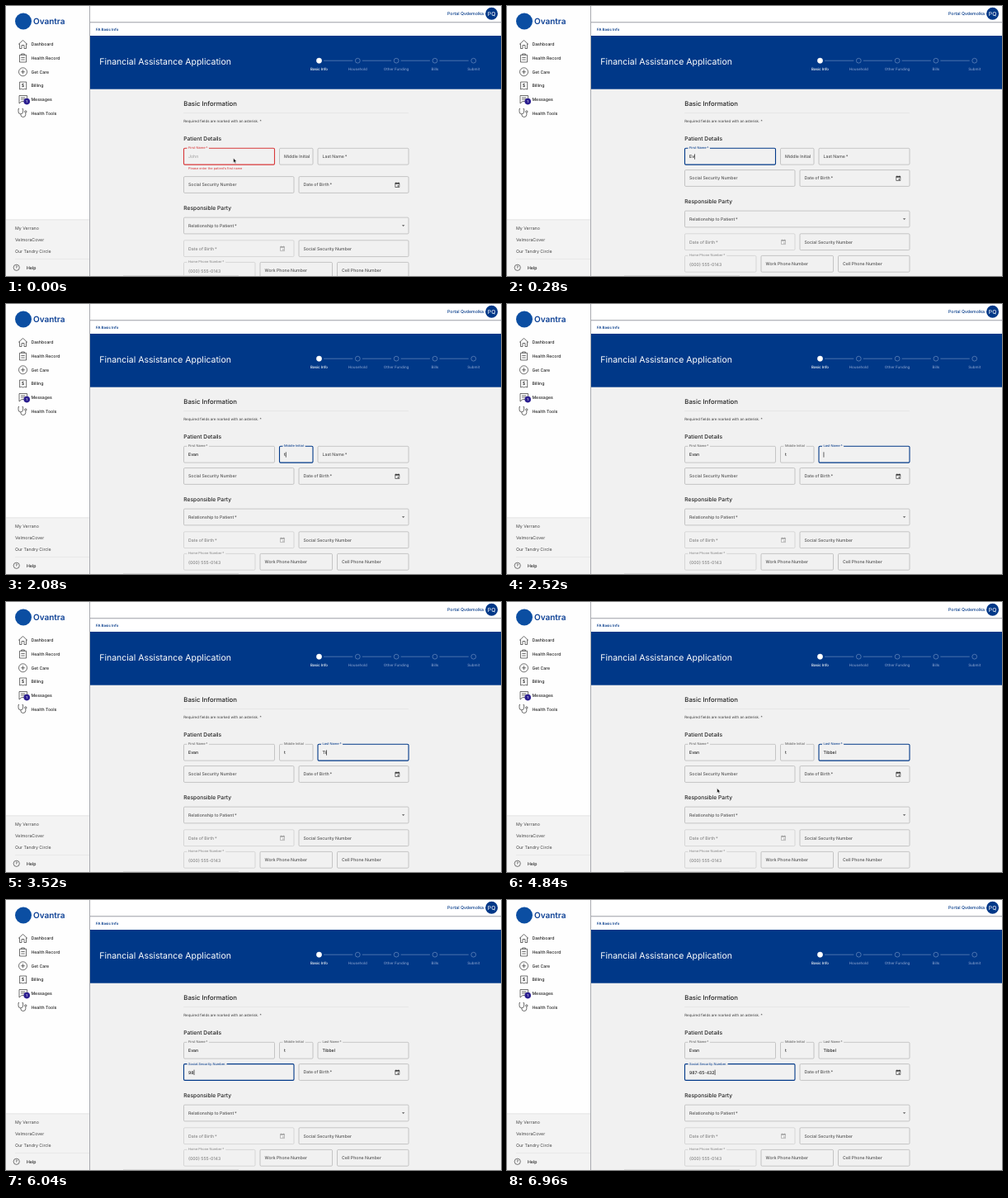
Animation of 600 by 327 pixels, one loop 7 s. Source, as an HTML page:

```html
<!DOCTYPE html>
<html lang="en">
<head>
<meta charset="utf-8">
<title>Application form</title>
<style>
  html, body { margin: 0; width: 100%; height: 100%; overflow: hidden; background: #f1f1f1; }
  svg { display: block; width: 600px; height: 327px; }
  text { font-family: Inter, sans-serif; text-rendering: geometricPrecision; white-space: pre; }
</style>
</head>
<body>
<svg viewBox="0 0 600 327"><g id="page"></g><g id="form"></g></svg>
<script>
const LOOP = 7000, STEP = 40;
const BG = '#f1f1f1', INK = '#222', GREY = '#555', PALE = '#9b9b9b';
const BLUE = '#003888', RED = '#d8383a';
const BODY = 5.2, SMALL = 4;
const pen = document.createElement('canvas').getContext('2d');

const widthOf = (s, size) => {
  pen.font = '500 100px Inter, sans-serif';
  return pen.measureText(s).width * size / 100;
};
// Text placed by its left edge and the middle of its capitals.
const text = (x, y, s, size = BODY, fill = INK, weight = 500, extra = '') =>
  `<text x="${x}" y="${y + size * .36}" font-size="${size}" fill="${fill}" font-weight="${weight}" ${extra}>${s}</text>`;
const rect = (x, y, w, h, fill, extra = '') =>
  `<rect x="${x}" y="${y}" width="${w}" height="${h}" fill="${fill}" ${extra}/>`;
const circle = (x, y, r, fill, extra = '') =>
  `<circle cx="${x}" cy="${y}" r="${r}" fill="${fill}" ${extra}/>`;
const path = (d, stroke = INK, width = .65, fill = 'none') =>
  `<path d="${d}" fill="${fill}" stroke="${stroke}" stroke-width="${width}"/>`;
const middle = 'text-anchor="middle"';

function drawPage() {
  const menu = ['Dashboard', 'Health Record', 'Get Care', 'Billing', 'Messages', 'Health Tools'];
  const steps = ['Basic Info', 'Household', 'Other Funding', 'Bills', 'Submit'];
  const icons = [
    'M15 46.5L20.5 41.5L26 46.5M16.5 45.5V51.5H19V47.5H22V51.5H24.5V45.5',
    'M16.5 59.3H24.5V68H16.5ZM18.7 59.3V58H22.3V59.3M18.3 62.5H22.7M18.3 65H22.7',
    'M15.5 79.8a5 5 0 1 0 10 0a5 5 0 1 0 -10 0M18 79.8H23M20.5 77.3V82.3',
    'M16.6 92H24.7V101L22.7 100.3L20.6 101L18.6 100.3L16.6 101Z',
    'M16 108.5H25.5V115.5H19L16 118ZM18 111H23.5M18 113H23.5',
    'M16 124.5H15V128a2.8 2.8 0 0 0 5.6 0V124.5H19.5M17.8 131V131.5a3 3 0 0 0 6 0V129.5M22.6 128a1.2 1.2 0 1 0 2.4 0a1.2 1.2 0 1 0 -2.4 0'
  ];
  let s = rect(102, 0, 498, 36, '#fff') +
    rect(102, 19, 498, 1, '#b6b8bd') + rect(102, 20, 498, 1, '#e4e4e7') +
    rect(102, 36, 498, 64.7, BLUE) +
    rect(0, 0, 101, 327, '#fefefe') + rect(0, 259, 101, 68, '#f3f3f3') +
    rect(0, 258.6, 101, .6, '#d2d2d2') + rect(11, 306, 90, .5, '#dcdcdc') +
    rect(101, 0, 1, 327, '#a9abb0');

  s += circle(21, 18.5, 10, '#0b4ea2') + text(33, 18.5, 'Ovantra', 10, '#0b3f94', 600);
  menu.forEach((name, i) => {
    s += path(icons[i]) + text(30.4, 46.3 + i * 16.7, name);
  });
  s += text(20.6, 96.4, '$', 5.4, INK, 500, middle) +
    circle(25.2, 115.6, 3.8, '#2c1f90') + text(25.2, 115.6, '1', 4, '#fff', 500, middle);
  ['My Verrano', 'VelmoraCover', 'Our Tandry Circle'].forEach((name, i) => {
    s += text(11, 269 + i * 14, name, 5.25, '#444', 400);
  });
  s += circle(12.7, 316.8, 3.6, 'none', `stroke="${INK}" stroke-width=".6"`) +
    text(12.7, 316.8, '?', 4.6, INK, 500, middle) + text(25, 317, 'Help');

  s += text(579, 9.2, 'Portal Qvdemolka', 5.2, BLUE, 500, 'text-anchor="end"') +
    circle(588.6, 9.2, 7.5, BLUE) + text(588.6, 9.2, 'PQ', 6.8, '#fff', 400, middle) +
    text(109, 28, 'FA Basic Info', 4.4, BLUE, 600) +
    text(113.2, 67.7, 'Financial Assistance Application', 10.5, '#fff', 400);
  steps.forEach((name, i) => {
    const x = 379.5 + i * 46.8, y = 66.2, tone = i ? '#7f9aca' : '#fff';
    if (i) s += path(`M${x - 41.3} ${y}H${x - 6}`, '#7f99c6', .6);
    s += circle(x, y, i ? 2.9 : 3.1, i ? 'none' : '#fff', `stroke="${tone}" stroke-width=".6"`) +
      text(x, 76.2, name, 4.5, tone, 500, middle);
  });

  s += text(215.3, 118.2, 'Basic Information', 7.75) + rect(215, 129.5, 273, .6, '#dedede') +
    text(215.3, 139.5, 'Required fields are marked with an asterisk. *', 4.42, '#3c3c3c', 400) +
    text(215.3, 160.3, 'Patient Details', 6.7);
  return s;
}

// Outlined box; `lift` moves its label from inside (0) to the top border (1).
function field(x, y, w, label, o = {}) {
  const { value = '', hint = '', lift = 0, focus = false, caret = false, error = false, disabled = false } = o;
  const accent = error ? RED : BLUE;
  const edge = focus ? accent : disabled ? '#c4c4c4' : '#a6a6a6';
  const size = BODY + (SMALL - BODY) * lift, mid = y + 10;
  let s = rect(x, y, w, 19.8, 'none', `rx="1.3" stroke="${edge}" stroke-width="${focus ? 1.1 : .6}"`);
  if (lift) s += rect(x + 4, y - 1, (widthOf(label, SMALL) + 3) * lift, 2, BG);
  s += text(x + 5.5, mid - 10.4 * lift, label, size, focus ? accent : disabled ? '#858585' : GREY, 500 - 100 * lift);
  if (value) s += text(x + 5.5, mid + .3, value, BODY, disabled ? '#858585' : INK);
  else if (hint) s += text(x + 5.5, mid + .3, hint, BODY, PALE, 400, `opacity="${lift}"`);
  if (caret) s += rect(x + 5.6 + widthOf(value, BODY), mid - 3, .7, 6.4, INK);
  return s;
}

const calendar = (x, y, tone) =>
  path(`M${x - 2.5} ${y - 2.3}H${x + 2.5}V${y + 2.8}H${x - 2.5}ZM${x - 1.5} ${y - 3.2}V${y - 2}M${x + 1.5} ${y - 3.2}V${y - 2}`, tone, .6) +
  rect(x - 2.5, y - 2.3, 5, 1.2, tone) + rect(x + .3, y + .6, 1.3, 1.3, tone);

// Fields in order of use: when focus arrives, and when each piece of text is typed.
const entries = [
  { start: -400, times: [40, 240, 400, 640], parts: [...'Evan'] },
  { start: 928, times: [1880], parts: ['t'] },
  { start: 2190, times: [3120, 3520, 3640, 3760, 3920, 4080], parts: [...'Tibbel'] },
  { start: 5345, times: [5880, 5960, 6080, 6320, 6480, 6600, 6760, 6920], parts: ['9', '8', '7-', '6', '5-', '4', '3', '2'] }
];

// cubic-bezier(0, 0, .2, 1), solved by bisection
function easeOut(x) {
  if (x <= 0 || x >= 1) return x <= 0 ? 0 : 1;
  let lo = 0, hi = 1;
  for (let i = 0; i < 20; i++) {
    const m = (lo + hi) / 2;
    if (.6 * (1 - m) * m * m + m ** 3 < x) lo = m; else hi = m;
  }
  return 3 * (1 - lo) * lo * lo + lo ** 3;
}

function entryState(i, t) {
  const { start, times, parts } = entries[i];
  const focus = t >= start && (i === 3 || t < entries[i + 1].start);
  const count = times.filter(k => k <= t).length;
  const since = t - (count ? times[count - 1] : start);
  return {
    value: parts.slice(0, count).join(''),
    lift: easeOut((t - start) / 200),
    focus,
    caret: focus && Math.floor(since / 500) % 2 === 0
  };
}

const route = [[4520, 275, 187], [4680, 259, 213], [4840, 254.6, 225.6], [4960, 262, 235], [5080, 289, 222], [5200, 310, 211]];

function pointer(t) {
  const arrow = (x, y) => path(`M${x} ${y}V${y + 5.6}L${x + 1.3} ${y + 4.5}L${x + 2.2} ${y + 6.5}L${x + 3.2} ${y + 6}L${x + 2.3} ${y + 4.1}H${x + 4}Z`, '#fff', .5, '#111');
  if (t < 40) return arrow(275.6, 184.2);
  if (t < 4520 || t >= 5880) return '';
  let x = 310, y = 211;
  const i = route.findIndex(p => p[0] > t);
  if (i > 0) {
    const [t0, x0, y0] = route[i - 1], [t1, x1, y1] = route[i], k = (t - t0) / (t1 - t0);
    x = x0 + (x1 - x0) * k;
    y = y0 + (y1 - y0) * k;
  }
  return t < 5120 ? arrow(x, y)
    : path(`M${x - 1.3} ${y - 3}H${x + 1.3}M${x} ${y - 3}V${y + 3}M${x - 1.3} ${y + 3}H${x + 1.3}`, '#222', .7);
}

function drawForm(t) {
  const error = t < entries[0].times[0];
  const [first, initial, last, ssn] = entries.map((_, i) => entryState(i, t));
  const top = 172.3, low = error ? 8 : 0, star = '\u2009*';
  return field(215.5, top, 110, 'First Name' + star, { ...first, hint: 'John', error, caret: first.caret && !error }) +
    field(331.5, top, 40.5, 'Middle Initial', initial) +
    field(378, top, 110, 'Last Name' + star, last) +
    (error ? text(221, 196.4, 'Please enter the patient\u2019s first name', 3.87, RED, 400) : '') +
    `<g transform="translate(0 ${low})">` +
    field(215.5, 198.6, 133.5, 'Social Security Number', { ...ssn, hint: '000-00-0000' }) +
    field(355, 198.6, 133, 'Date of Birth' + star) + calendar(474.3, 208.7, INK) +
    text(215.3, 236.4, 'Responsible Party', 6.7) +
    field(215.5, 248.1, 272.5, 'Relationship to Patient' + star) +
    path('M479.9 257.3H483.3L481.6 259.1Z', 'none', 0, '#555') +
    field(215.5, 275.8, 133.5, 'Date of Birth' + star, { disabled: true }) + calendar(335, 285.8, PALE) +
    field(355, 275.8, 133, 'Social Security Number') +
    field(215.5, 302.4, 86.5, 'Home Phone Number' + star, { value: '(000) 555-0143', lift: 1, disabled: true }) +
    field(308, 302.4, 87.5, 'Work Phone Number') +
    field(401.5, 302.4, 86.5, 'Cell Phone Number') + '</g>' +
    rect(142, 326, 140, 1, '#dadada') + pointer(t);
}

const page = document.getElementById('page'), form = document.getElementById('form');
page.innerHTML = drawPage();
let shown = -1;
function tick() {
  const t = Math.floor(performance.now() % LOOP / STEP) * STEP;
  if (t !== shown) form.innerHTML = drawForm(shown = t);
  requestAnimationFrame(tick);
}
tick();
</script>
</body>
</html>
```
